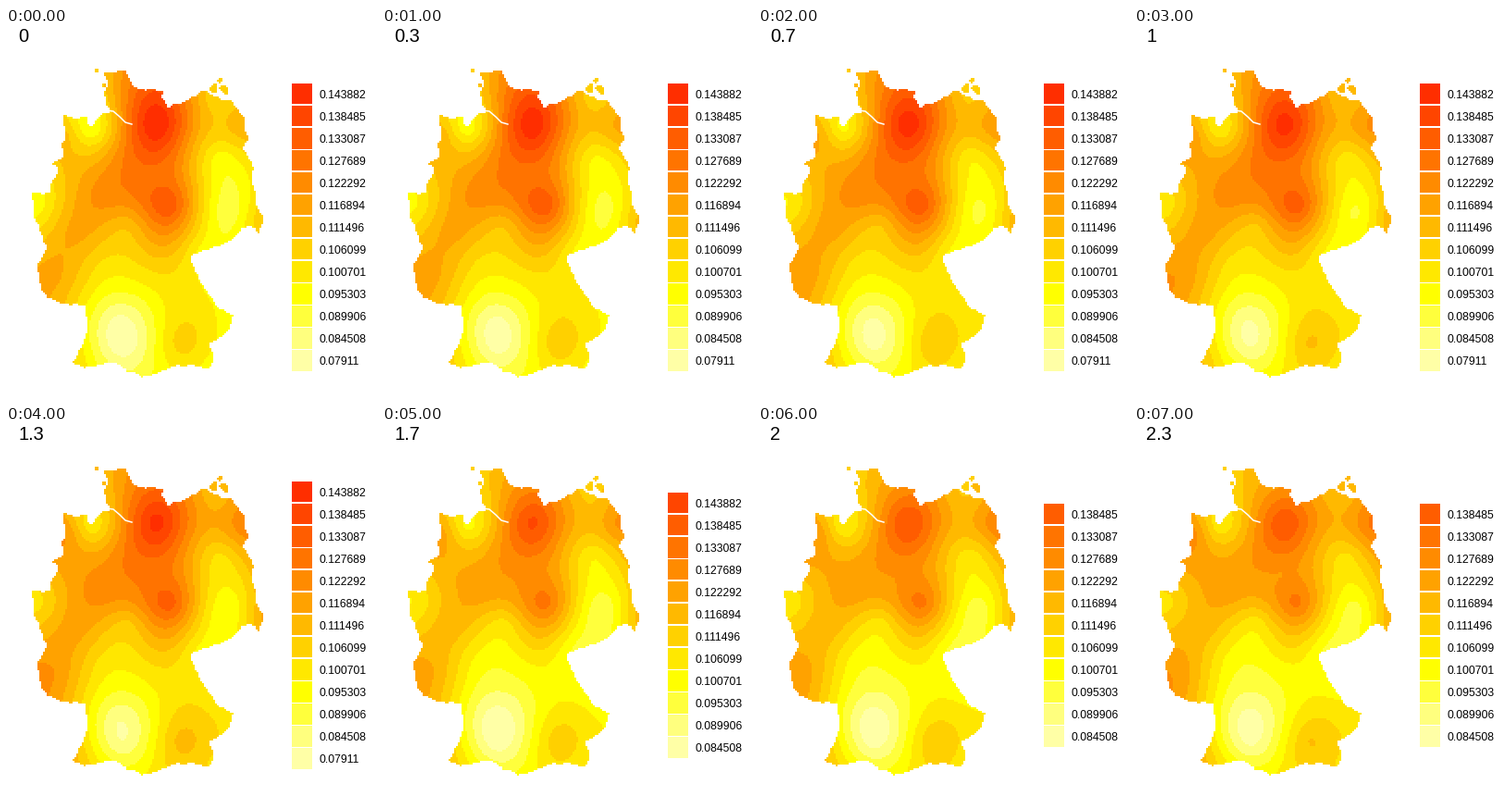
A matplotlib script for the animation above (8 s loop, 400 by 400 pixels).

```python
import numpy as np
import matplotlib.pyplot as plt
from matplotlib.animation import FuncAnimation
from matplotlib.patches import Rectangle
from matplotlib.path import Path

SIZE, DPI, CELL, FRAMES = 400, 100, 2, 8
LOWEST, STEP = 0.0791104, 0.00539767

# Pale yellow to yellow, then evenly on to red
PALETTE = np.array([(255, 255, b) for b in (166, 126, 60)]
                   + [(255, 255 - 23.2 * k, 0) for k in range(10)]) / 255

# Corners of the border, clockwise from the north-west
BORDER = [
    (103, 46), (129, 46), (138, 63), (160, 66), (168, 72), (175, 86),
    (197, 78), (212, 67), (224, 73), (244, 79), (257, 96), (262, 118),
    (256, 130), (266, 146), (269, 176), (279, 206), (273, 222),
    (262, 213), (250, 223), (222, 238), (199, 246), (213, 279),
    (245, 311), (243, 322), (219, 341), (225, 358), (220, 369),
    (202, 365), (164, 373), (147, 377), (117, 362), (85, 367), (72, 362),
    (87, 311), (86, 301), (45, 292), (39, 284), (33, 256), (44, 240),
    (38, 222), (29, 192), (28, 179), (48, 177), (57, 152), (50, 147),
    (61, 141), (64, 113), (62, 95), (87, 95), (92, 107), (104, 92),
    (113, 91), (106, 70), (110, 58)]
ISLANDS = [(98, 46, 3), (106, 62, 3), (167, 70, 3), (225, 65, 5),
           (236, 66, 6), (232, 57, 3)]
ESTUARY = [(108, 89), (116, 90), (123, 96), (129, 102), (136, 104)]

# x, y and height in legend steps at the start
HILLS = [
    (103, 50, 6.0), (130, 52, 8.4), (160, 74, 11.4), (163, 104, 13.0),
    (163, 125, 11.7), (225, 76, 5.3), (252, 108, 6.6), (200, 125, 7.5),
    (230, 140, 3.6), (240, 198, 2.3), (273, 208, 5.6), (205, 244, 4.0),
    (177, 192, 10.8), (160, 160, 9.6), (92, 109, 3.1), (66, 115, 6.1),
    (118, 140, 8.2), (105, 184, 8.5), (36, 190, 3.5), (75, 218, 7.4),
    (133, 212, 6.4), (55, 268, 7.2), (98, 252, 5.2), (170, 235, 7.1),
    (195, 265, 4.5), (130, 285, 3.1), (122, 318, 0.5), (125, 342, 0.2),
    (90, 330, 3.0), (77, 352, 4.7), (115, 366, 2.1), (155, 333, 2.3),
    (188, 340, 5.4), (222, 362, 3.6), (238, 315, 3.7)]
# x, y and change of height by the end
DRIFT = [
    (103, 50, 0.5), (155, 72, -1.8), (163, 106, -1.1), (225, 80, 2.0),
    (95, 110, 2.2), (115, 150, 0.3), (245, 165, 2.6), (177, 192, -0.6),
    (272, 208, 1.8), (230, 230, 0.4), (50, 260, 1.3), (85, 235, -0.1),
    (140, 285, 0.0), (125, 335, 1.4), (238, 318, 1.7)]

rng = np.random.default_rng(4)


def roughen(points, rounds=3, amount=0.11):
    """Split every edge and push its middle sideways at random."""
    points = np.array(points, float)
    for _ in range(rounds):
        edge = np.roll(points, -1, axis=0) - points
        normal = np.column_stack([-edge[:, 1], edge[:, 0]])
        push = rng.uniform(-amount, amount, (len(points), 1))
        middle = points + edge / 2 + push * normal
        points = np.stack([points, middle], axis=1).reshape(-1, 2)
    return points


def island(x, y, r):
    angle = np.arange(6) * np.pi / 3
    radius = r * rng.uniform(0.6, 1.3, 6)
    return roughen(np.column_stack([x + radius * np.cos(angle),
                                    y + radius * np.sin(angle)]))


def spline(knots, targets):
    """Thin-plate spline through rows of x, y, value."""
    def kernel(a, b):
        r2 = ((a[:, None] - b[None]) ** 2).sum(-1)
        return r2 * np.log(r2 + 1e-12)

    def plane(a):
        return np.column_stack([np.ones(len(a)), a])

    knots = np.array(knots)
    points, n = knots[:, :2] / 100, len(knots)
    targets = targets / 100
    system = np.zeros((n + 3, n + 3))
    system[:n, :n] = kernel(points, points)
    system[:n, n:] = plane(points)
    system[n:, :n] = plane(points).T
    weights = np.linalg.solve(system, np.append(knots[:, 2], [0, 0, 0]))
    return kernel(targets, points) @ weights[:n] + plane(targets) @ weights[n:]


count = SIZE // CELL
centres = (np.arange(count) + 0.5) * CELL
cells = np.stack(np.meshgrid(centres, centres), axis=-1).reshape(-1, 2)
shapes = [roughen(BORDER)] + [island(*spec) for spec in ISLANDS]
inside = np.any([Path(s).contains_points(cells) for s in shapes], axis=0)
inside = inside.reshape(count, count)
start = spline(HILLS, cells).reshape(count, count)
drift = spline(DRIFT, cells).reshape(count, count)

fig = plt.figure(figsize=(SIZE / DPI, SIZE / DPI), dpi=DPI, facecolor="white")
ax = fig.add_axes([0, 0, 1, 1])


def label(x, y, text, px):
    ax.text(x, y, text, family="Liberation Sans", fontsize=px * 72 / DPI,
            color="black", ha="left", va="baseline")


def legend(low, high):
    top = 215.2 - 12 * (high - low + 1)
    for row, k in enumerate(range(high, low - 1, -1)):
        y = top + 24 * row
        ax.add_patch(Rectangle((308.5, y + 0.7), 22.4, 22.6, ec="none",
                               fc=PALETTE[k - low]))
        label(338.6, y + 16.8, f"{round(LOWEST + k * STEP, 6):g}", 12.3)


def draw(i):
    ax.clear()
    ax.axis("off")
    # The lowest and then the highest class drop out as the field flattens
    low = 0 if i < 5 else 1
    high = 12 if i < 6 else 11
    field = start + drift * i / (FRAMES - 1)
    rank = np.clip(np.floor(field), low, high).astype(int) - low
    image = np.where(inside[..., None], PALETTE[rank], 1.0)
    ax.imshow(image, extent=(0, SIZE, SIZE, 0), interpolation="nearest")
    ax.plot(*zip(*ESTUARY), color="white", lw=1.1)
    legend(low, high)
    label(13.2, 15, f"{round(i / 3, 1):g}", 20)
    ax.set(xlim=(0, SIZE), ylim=(SIZE, 0))
    return ax.get_children()


anim = FuncAnimation(fig, draw, frames=FRAMES, interval=1000,
                     repeat=True, repeat_delay=0, blit=False)
plt.show()
```
